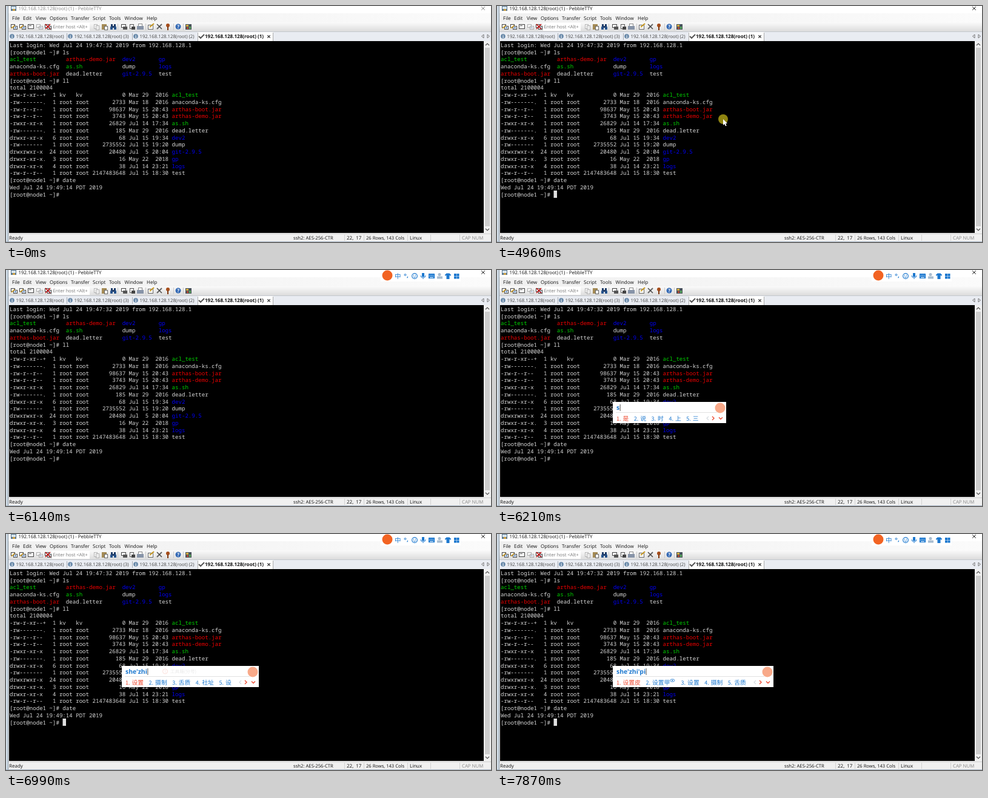
An HTML page with a canvas that plays this animation: 800 by 390 pixels, repeating every 8000 ms.

```html
<!DOCTYPE html>
<html lang="en">
<head>
<meta charset="utf-8">
<title>Terminal session</title>
<style>
html, body { margin: 0; width: 100%; height: 100%; overflow: hidden; background: #f0f0f0; }
canvas { display: block; }
</style>
</head>
<body>
<canvas id="stage" width="800" height="390"></canvas>
<script>
const LOOP = 8000;
const UI = '"Open Sans", sans-serif';
const CJK = '"Noto Sans CJK SC", "Noto Sans CJK", sans-serif';
const BLUE = '#1c78cf', RED = '#ee4b32', ORANGE = '#f26322';
const COL = 5.46, ROW = 11.74;

const screen = `Last login: Wed Jul 24 19:47:32 2019 from 192.168.128.1
[root@node1 ~]# ls
acl_test         arthas-demo.jar  dev2       gp
anaconda-ks.cfg  as.sh            dump       logs
arthas-boot.jar  dead.letter      git-2.9.5  test
[root@node1 ~]# ll
total 2100004
-rw-r-xr--+  1 kv   kv            0 Mar 29  2016 acl_test
-rw-------.  1 root root       2733 Mar 18  2016 anaconda-ks.cfg
-rw-r--r--   1 root root      98637 May 15 20:43 arthas-boot.jar
-rw-r--r--   1 root root       3743 May 15 20:43 arthas-demo.jar
-rwxr-xr-x   1 root root      26829 Jul 14 17:34 as.sh
-rw-------.  1 root root        185 Mar 29  2016 dead.letter
drwxr-xr-x   6 root root         68 Jul 15 19:34 dev2
-rw-------   1 root root    2735552 Jul 15 19:20 dump
drwxrwxr-x  24 root root      20480 Jul  5 20:04 git-2.9.5
drwxr-xr-x.  3 root root         16 May 22  2018 gp
drwxr-xr-x   4 root root         38 Jul 14 23:21 logs
-rw-r--r--   1 root root 2147483648 Jul 15 18:30 test
[root@node1 ~]# date
Wed Jul 24 19:49:14 PDT 2019
[root@node1 ~]#`.split('\n');

const wordColor = word =>
  /^(acl_test|as\.sh)$/.test(word) ? '#00d000' :
  /\.jar$/.test(word) ? '#ec0000' :
  /^(dev2|gp|logs|git-.*)$/.test(word) ? '#0000f4' : '#d6d6d6';

// Start time, typed letters, candidates
const typing = [
  [6210, 's', '是 说 时 上 三'],
  [6290, 'sh', '是 说 时 上 谁'],
  [6360, 'she', '设 社 射 蛇 舍'],
  [6440, "she'z", '设置 社长 设在 社招 赊账'],
  [6520, "she'zh", '设置 社长 摄制 舌质 社址'],
  [6620, "she'zhi", '设置 摄制 舌质 社址 设'],
  [7780, "she'zhi'p", '设置屏幕 设置屏保 设置排版 设置平台 设置'],
  [7870, "she'zhi'pi", '设置皮 设置甲* 设置 摄制 舌质']
];

const canvas = document.getElementById('stage');
const back = document.createElement('canvas');
back.width = 800;
back.height = 390;
let g = back.getContext('2d');

function rect(x, y, w, h, color) {
  g.fillStyle = color;
  g.fillRect(x, y, w, h);
}
function fade(x0, y0, x1, y1, from, to) {
  const gradient = g.createLinearGradient(x0, y0, x1, y1);
  gradient.addColorStop(0, from);
  gradient.addColorStop(1, to);
  return gradient;
}
function box(x, y, w, h, color) {
  g.strokeStyle = color;
  g.lineWidth = 1;
  g.strokeRect(x, y, w, h);
}
function text(str, x, y, color = '#111', size = 8, family = UI, weight = 400) {
  g.font = `${weight} ${size}px ${family}`;
  g.textBaseline = 'alphabetic';
  g.textRendering = 'geometricPrecision';
  g.fillStyle = color;
  g.fillText(str, x, y);
}
function line(points, color, width = 1) {
  g.beginPath();
  points.forEach(([x, y]) => g.lineTo(x, y));
  g.strokeStyle = color;
  g.lineWidth = width;
  g.stroke();
}
function disc(x, y, r, color) {
  g.beginPath();
  g.arc(x, y, r, 0, 7);
  g.fillStyle = color;
  g.fill();
}
function ring(x, y, r, color, width = 1) {
  g.beginPath();
  g.arc(x, y, r, 0, 7);
  g.strokeStyle = color;
  g.lineWidth = width;
  g.stroke();
}
function cross(x, y, r, color, width) {
  line([[x - r, y - r], [x + r, y + r]], color, width);
  line([[x - r, y + r], [x + r, y - r]], color, width);
}
function page(x, y, w, h, color) {
  rect(x, y, w, h, '#fff');
  box(x + .5, y + .5, w - 1, h - 1, color);
}
function monitor(x, y) {
  page(x - 5, y - 4, 7, 6, '#444');
  page(x - 1, y - 1, 7, 6, '#444');
  rect(x + 1, y + 1, 3, 2, '#5a8ac0');
}

function drawToolbar() {
  rect(4, 27, 796, 15, fade(0, 27, 0, 42, '#fafafa', '#dcdcdc'));
  [13, 27].forEach(x => {
    monitor(x, 34);
    line([[x - 4, 37], [x + 1, 32]], '#d9a520', 1.4);
  });
  page(36, 30, 10, 8, '#444');
  rect(38, 32, 4, 1, '#555');
  g.globalAlpha = .4;
  monitor(55, 34);
  g.globalAlpha = 1;
  monitor(69, 34);
  cross(69, 34, 4, '#c01818', 1.7);
  rect(76, 28, 62, 13, '#fff');
  text('Enter host <Alt+', 77.5, 37, '#777', 7.7);
  g.globalAlpha = .5;
  page(145, 30, 6, 8, '#777');
  page(148, 32, 6, 8, '#777');
  g.globalAlpha = 1;
  rect(158, 30, 8, 9, '#a58b55');
  page(162, 33, 6, 7, '#666');
  rect(173, 30, 3, 4, '#1e3c68');
  rect(178, 30, 3, 4, '#1e3c68');
  rect(172, 34, 4, 5, '#27548c');
  rect(178, 34, 4, 5, '#27548c');
  rect(175, 33, 4, 3, '#1e3c68');
  page(190, 30, 8, 6, '#444');
  rect(193, 34, 7, 5, '#555');
  page(204, 30, 7, 8, '#555');
  rect(207, 34, 6, 5, '#444');
  page(218, 29, 7, 5, '#888');
  rect(216, 33, 11, 6, '#8794a8');
  page(234, 31, 9, 8, '#666');
  line([[237, 35], [244, 29]], '#c89922', 2);
  line([[249, 38], [257, 30]], '#666', 2);
  line([[249, 30], [257, 38]], '#444', 1.5);
  disc(267, 32, 3, '#a54d1b');
  rect(266, 34, 2, 6, '#7c3710');
  disc(284, 34, 4.5, '#3268b4');
  text('?', 282.2, 37, '#fff', 8, UI, 700);
  rect(296, 30, 10, 9, '#47515b');
  rect(297, 31, 4, 3, '#d7b040');
  rect(302, 34, 3, 4, '#56a25a');
  rect(298, 35, 3, 3, '#b94b35');
  [184, 230, 276, 292].forEach(x => rect(x, 29, 1, 11, '#c8c8c8'));
}

function drawTabs() {
  rect(4, 43, 796, 15, '#e9ecf2');
  rect(4, 42, 796, 1, '#c4c8ce');
  [[10, '192.168.128.128(root)'], [106, '192.168.128.128(root) (3)'], [214, '192.168.128.128(root) (2)']]
    .forEach(([x, name]) => {
      disc(x, 50, 3.8, '#6687a8');
      rect(x - .5, 48, 1.2, 1, '#fff');
      rect(x - .5, 49.7, 1.2, 3, '#fff');
      text(name, x + 6.5, 53, '#444', 7.75);
    });
  [100, 208].forEach(x => rect(x, 45, 1, 11, '#a5aab3'));
  rect(316, 43, 125, 15, '#fff');
  rect(316, 44, 1, 14, '#aaa');
  rect(440, 44, 1, 14, '#aaa');
  line([[318, 50], [321, 53], [327, 47]], '#555', 2);
  text('192.168.128.128(root) (1)', 328, 53, '#111', 8.1, UI, 700);
  cross(433.5, 50.5, 2.2, '#222', 1.2);
  line([[788, 47], [784.5, 50], [788, 53], [788, 47]], '#777');
  line([[794, 47], [797.5, 50], [794, 53], [794, 47]], '#777');
}

function drawStatus() {
  rect(4, 376, 796, 14, '#f0f0f0');
  rect(4, 376, 796, 1, '#d0d0d0');
  text('Ready', 5, 386);
  text('ssh2: AES-256-CTR', 474, 386, '#111', 7.7);
  text('22,  17', 562, 386);
  text('26 Rows, 143 Cols', 594, 386, '#111', 7.6);
  text('Linux', 666, 386);
  text('CAP NUM', 752, 386, '#888', 7.8);
  [558, 590, 662, 700, 748].forEach(x => rect(x, 378, 1, 10, '#d2d2d2'));
  rect(0, 389, 800, 1, '#a5b4c4');
}

function drawTerminal() {
  rect(5, 58, 783, 317, '#000');
  screen.forEach((row, r) => {
    for (const word of row.matchAll(/\S+/g)) {
      const color = wordColor(word[0]);
      [...word[0]].forEach((ch, i) =>
        text(ch, 6 + (word.index + i) * COL, 68 + r * ROW, color, 9.13, '"Noto Sans Mono", monospace'));
    }
  });
  rect(788, 58, 12, 318, '#f0f0f0');
  rect(790, 69, 8, 295, '#cdcdcd');
  line([[791, 65], [794, 62], [797, 65]], '#555', 1.2);
  line([[791, 368], [794, 371], [797, 368]], '#555', 1.2);
}

function drawWindow() {
  rect(0, 0, 800, 390, '#f0f0f0');
  rect(0, 0, 800, 12, '#fff');
  rect(4, 12, 796, 15, fade(4, 0, 800, 0, '#f0f0f0', '#fbfbfb'));
  rect(0, 0, 4, 390, '#e3e9ef');
  rect(1, 0, 1, 390, '#b6cadb');
  rect(3, 0, 1, 390, '#7c8d9c');
  rect(8, 0, 9, 8, '#57748c');
  rect(9, 1, 7, 4, '#d8e6ef');
  rect(11, 5, 4, 3, '#c99d42');
  [['File', 10], ['Edit', 28], ['View', 49], ['Options', 72], ['Transfer', 107],
    ['Script', 143], ['Tools', 170], ['Window', 195.5], ['Help', 232]]
    .forEach(([name, x]) => text(name, x, 23));
  drawToolbar();
  drawTabs();
  drawTerminal();
  drawStatus();
}

function drawInputBar() {
  rect(618, 0, 132, 19, '#fff');
  disc(629, 9, 8.5, ORANGE);
  text('中', 641, 14, BLUE, 10.5, CJK, 500);
  ring(658.5, 8, 1.4, BLUE);
  text(',', 661, 12, BLUE, 10, UI, 700);
  ring(674, 10, 4.3, BLUE, 1.2);
  rect(672, 8, 1, 1.5, BLUE);
  rect(675, 8, 1, 1.5, BLUE);
  line([[672, 11], [674, 12.4], [676, 11]], BLUE);
  rect(686, 5, 4, 6, BLUE);
  line([[684, 9], [685, 12], [691, 12], [692, 9]], BLUE);
  rect(687.5, 12, 1, 3, BLUE);
  rect(697, 6, 10, 8, BLUE);
  for (let i = 0; i < 6; i++) rect(698.5 + i % 3 * 2.7, 8 + (i / 3 | 0) * 2, 1, 1, '#fff');
  rect(699, 12, 6, 1, '#fff');
  disc(715, 7.5, 2.5, '#a9bdd0');
  rect(711, 10.5, 9, 4, '#a9bdd0');
  rect(726.5, 7, 5, 8, BLUE);
  line([[724.5, 9], [727, 6.5], [731, 6.5], [733.5, 9]], BLUE, 2.2);
  [[739, 6], [743.5, 6], [739, 10.5], [743.5, 10.5]].forEach(([x, y]) => rect(x, y, 4, 4, BLUE));
}

function drawPopup([, letters, list], t) {
  const items = list.split(' ');
  const widthOf = s => 10.5 + [...s].length * 9.8;
  const right = Math.round(items.reduce((x, s) => x + widthOf(s) + 8.5, 197) + 36.5);
  rect(191, 218, right - 191, 35, '#fff');
  rect(196, 235, right - 211, 1, '#e2e2e2');
  text(letters, 197, 231, BLUE, 10.4, UI, 700);
  rect(197.5 + g.measureText(letters).width, 222, 1, 11, '#555');
  let x = 197;
  items.forEach((item, i) => {
    const color = i ? BLUE : RED;
    const word = item.replace('*', '');
    text(i + 1 + '.', x, 248.5, color, 9, CJK);
    text(word, x + 10.5, 248.5, color, 9.8, CJK, 300);
    if (word !== item) {
      const cx = x + 10.5 + word.length * 9.8 + 4;
      g.beginPath();
      g.ellipse(cx, 242, 3.7, 2.2, 0, 0, 7);
      g.strokeStyle = BLUE;
      g.lineWidth = .8;
      g.stroke();
      disc(cx, 242, 1, BLUE);
    }
    x += widthOf(item) + 8.5;
  });
  line([[right - 29, 242], [right - 32, 245], [right - 29, 248]], '#d6dbe0', 1.2);
  line([[right - 23, 242], [right - 20, 245], [right - 23, 248]], RED, 1.4);
  line([[right - 12, 243.5], [right - 9, 246.5], [right - 6, 243.5]], RED, 1.4);
  disc(right - 10, 228, 8.5, '#f8a989');
  if (letters === "she'zhi") {
    g.globalAlpha = Math.max(0, Math.min(1, (t - 6910) / 470));
    ring(262.5, 227, 4, RED);
    text('1', 260.7, 229.8, RED, 7);
    text('工具箱(分号)', 271, 230, '#888', 7.6, CJK);
    g.globalAlpha = 1;
  }
}

function drawPointer(x, y) {
  g.beginPath();
  [[0, 0], [0, 10], [2.3, 8], [4, 11.5], [5.7, 10.7], [4.1, 7.2], [7, 7]]
    .forEach(([dx, dy]) => g.lineTo(x + dx, y + dy));
  g.fillStyle = '#fff';
  g.fill();
}

function draw(t) {
  g.drawImage(back, 0, 0);
  const active = t >= 4960;
  text('192.168.128.128(root) (1) - PebbleTTY', 20.5, 7, active ? '#111' : '#888', 7.9);
  cross(787, 4, 2.8, active ? '#222' : '#888', 1);
  if (t >= 5040) drawInputBar();

  const cursorOn = active && t < 6060 || t >= 6570 && t < 7100 || t >= 7630;
  if (cursorOn) rect(93.5, 305, 5.5, 12, '#e0e0e0');

  if (t >= 140 && t < 6060) {
    const step = Math.min(7, Math.floor((t - 140) / 75.7));
    const left = (1 - step / 7) ** 2;
    if (t >= 4960 && t < 5120) disc(373, 187, 8, '#8f8410');
    drawPointer(373 + 298 * left, 187 + 167 * left);
  }
  if (t >= 5830 && t < 5880) ring(382.5, 186.5, 3.6, '#4aa3e0', 1.6);

  const typed = typing.filter(([start]) => t >= start).pop();
  if (typed) drawPopup(typed, t);
}

drawWindow();
g = canvas.getContext('2d');
function tick() {
  draw(performance.now() % LOOP);
  requestAnimationFrame(tick);
}
tick();
</script>
</body>
</html>
```
